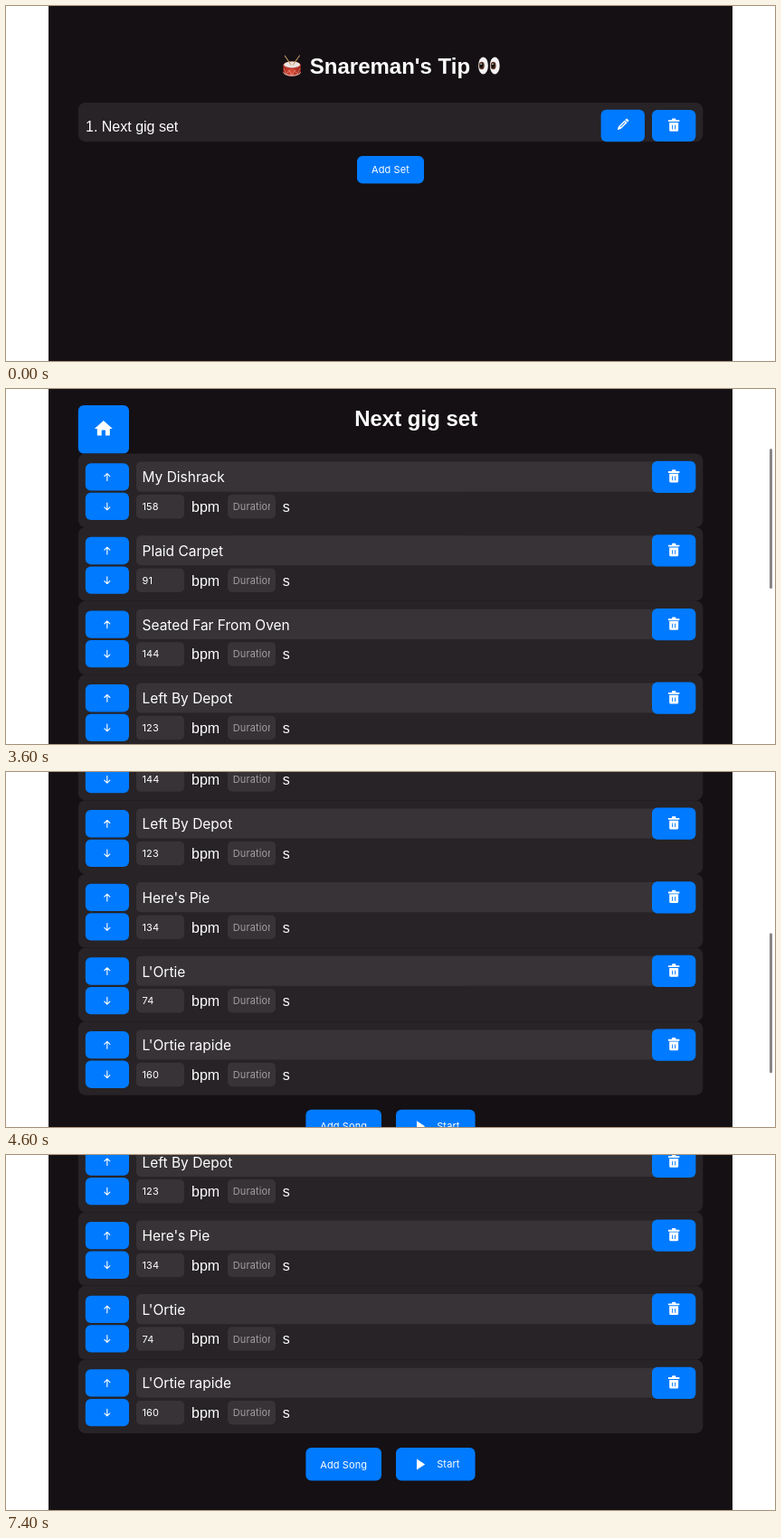
An HTML page for the animation above (8000 ms loop, 850x393 px).

```html
<!DOCTYPE html>
<html lang="en">
<head>
<meta charset="utf-8">
<title>Set list</title>
<style>
html, body { margin: 0; width: 100%; height: 100%; overflow: hidden; background: #fff; }
svg { display: block; }
#stage { position: absolute; left: 0; top: 0; }
text { fill: #fff; }
.head { font: bold 24px "Liberation Sans", Arial, sans-serif; }
.label { font: 16px "Liberation Sans", Arial, sans-serif; }
.name { font: 15.5px Inter, sans-serif; }
.small { font: 11px Inter, sans-serif; letter-spacing: .12px; }
.hint { fill: #a19ea1; }
</style>
</head>
<body>
<svg id="stage" width="850" height="393" viewBox="0 0 850 393">
  <defs>
    <linearGradient id="shell">
      <stop offset="0" stop-color="#a3261c"/>
      <stop offset=".45" stop-color="#dc4b36"/>
      <stop offset="1" stop-color="#962017"/>
    </linearGradient>
    <g id="trash" fill="#fff">
      <path d="M-2.2-5.4V-6.2Q-2.2-7.2-1.2-7.2H1.2Q2.2-7.2 2.2-6.2V-5.4H6.2V-3.5H-6.2V-5.4Z"/>
      <path fill-rule="evenodd" d="M-5-2.6H5V5.6Q5 7.1 3.5 7.1H-3.5Q-5 7.1-5 5.6ZM-2 .2V4.8H-1V.2ZM1 .2V4.8H2V.2Z"/>
    </g>
    <g id="pencil" transform="rotate(45)">
      <path fill="#fff" d="M-1.9-5H1.9V4.6L0 8.2L-1.9 4.6ZM-1.9-5.7V-7.3Q-1.9-8.2-1-8.2H1Q1.9-8.2 1.9-7.3V-5.7Z"/>
      <path fill="#007aff" d="M-.4-3.2H.4V3.6H-.4Z"/>
    </g>
    <path id="house" fill="#fff" d="M0-8.3L10 .6H7V8.3H2.1V2.3H-2.1V8.3H-7V.6H-10Z"/>
    <path id="arrow" fill="none" stroke="#fff" stroke-width="1.1" stroke-linecap="round" stroke-linejoin="round" d="M0 4V-3.6M-3-.8L0-3.8L3-.8"/>
    <g id="drum">
      <path fill="url(#shell)" d="M306.4 65V73.3A9.7 4.5 0 0 0 325.8 73.3V65Z"/>
      <path fill="none" stroke="#e8b9a0" stroke-width=".5" d="M307 69L310 75.5L313 71L316 77L319 71L322 75.5L325 69"/>
      <path fill="none" stroke="#cfc4c0" stroke-width="1" d="M306.6 73.4A9.6 4.3 0 0 0 325.6 73.4"/>
      <ellipse cx="316.1" cy="65.6" rx="9.7" ry="4.3" fill="#b93a30"/>
      <ellipse cx="316.1" cy="64.9" rx="9" ry="3.5" fill="#e9e4e1"/>
      <path fill="none" stroke="#c79a68" stroke-width="1.1" stroke-linecap="round" d="M308.3 55.2L315 65M324.4 55L317.4 65"/>
    </g>
    <g id="eye">
      <ellipse rx="5.4" ry="9.4" fill="#f4f2f2"/>
      <ellipse cx="-1.7" rx="3" ry="4.2" fill="#5b3426"/>
      <ellipse cx="-1.9" rx="1.8" ry="2.7" fill="#140d0b"/>
      <circle cx="-2.4" cy="-1.8" r=".8" fill="#fff"/>
    </g>
  </defs>
  <g id="home"></g>
  <g id="set"></g>
  <rect id="bar" x="844" width="3" rx="1.5" fill="#878487"/>
</svg>
<script>
const BG = "#151013", CARD = "#272326", FIELD = "#373336", BLUE = "#007aff";
const ROW_TOP = 71.4, ROW_H = 81.63, MAX_SCROLL = 334.7;
const $ = id => document.getElementById(id);

const box = (x, y, w, h, r, fill) =>
  `<rect x="${x}" y="${y}" width="${w}" height="${h}" rx="${r}" fill="${fill}"/>`;
const text = (x, y, cls, str, anchor = "start") =>
  `<text x="${x}" y="${y}" class="${cls}" text-anchor="${anchor}">${str}</text>`;
const icon = (id, x, y, extra = "") =>
  `<use href="#${id}" transform="translate(${x} ${y}) ${extra}"/>`;
const panel = (top, bottom) => box(47, top, 756, bottom - top, 0, BG);
const trashButton = y => box(714, y, 48.4, 35.2, 6, BLUE) + icon("trash", 738.2, y + 16.7);

const songs = [
  ["My Dishrack", 158],
  ["Plaid Carpet", 91],
  ["Seated Far From Oven", 144],
  ["Left By Depot", 123],
  ["Here's Pie", 134],
  ["L'Ortie", 74],
  ["L'Ortie rapide", 160]
];

function songRow([name, bpm], i) {
  return `<g transform="translate(0 ${ROW_TOP + i * ROW_H})">` +
    box(79.8, 0, 690.6, ROW_H, 8, CARD) +
    box(87.8, 10.8, 48.2, 30.3, 6, BLUE) + icon("arrow", 111.8, 26) +
    box(87.8, 43.4, 48.2, 30.3, 6, BLUE) + icon("arrow", 111.8, 58.7, "rotate(180)") +
    box(144, 9.2, 580, 33.1, 5, FIELD) + text(150.5, 32, "name", name) +
    trashButton(8.3) +
    box(144, 45.5, 53, 26.5, 5, FIELD) + text(150.5, 62.8, "small", bpm) +
    text(205, 64.6, "label", "bpm") +
    box(245, 45.5, 53, 26.5, 5, FIELD) +
    `<svg x="250.8" y="46" width="41.2" height="26">${text(0, 16.8, "small hint", "Duration")}</svg>` +
    text(305.8, 64.6, "label", "s") + "</g>";
}

$("home").innerHTML =
  panel(0, 393) +
  icon("drum", 0, 0) + text(335.8, 74.5, "head", "Snareman's Tip") +
  icon("eye", 527.5, 66) + icon("eye", 540.3, 66) +
  box(79.8, 107, 690.6, 43.2, 8, CARD) +
  text(88, 138.5, "label", "1. Next gig set") +
  box(657.6, 114.8, 48.4, 35.4, 6, BLUE) + icon("pencil", 681.6, 131.4) +
  trashButton(114.9) +
  box(388, 166, 74, 30.4, 6, BLUE) + text(425, 185.4, "small", "Add Set", "middle");

$("set").innerHTML =
  panel(-80, 393 + MAX_SCROLL) +
  box(79.8, 18, 56.2, 53.4, 6, BLUE) + icon("house", 107.8, 43.3) +
  text(453.2, 41.2, "head", "Next gig set", "middle") +
  songs.map(songRow).join("") +
  box(331.4, 658.8, 83.6, 36.5, 6, BLUE) + text(373.2, 681.3, "small", "Add Song", "middle") +
  box(431, 658.8, 87.6, 36.5, 6, BLUE) +
  `<path d="M454 671.2L463.2 677.2L454 683.2Z" fill="#fff"/>` +
  text(476.2, 680.8, "small", "Start");

// start time, page, scroll, scroll bar opacity
const steps = [
  [0, "home", 0, 0],
  [600, "home", 0, .5],
  [800, "home", 0, 1],
  [1600, "home", 0, .43],
  [1800, "home", 0, 0],
  [2600, "set", -13, 0],
  [3600, "set", 0, 1],
  [3800, "set", 10, 1],
  [4400, "set", 150, 1],
  [4600, "set", 285, 1],
  [4800, "set", 350, 1],
  [5000, "set", 339.3, 1],
  [5200, "set", 335.8, 1],
  [5400, "set", MAX_SCROLL, 1],
  [6400, "set", MAX_SCROLL, .43],
  [6600, "set", MAX_SCROLL, 0]
];

function draw(now) {
  const t = now % 8000;
  const [, page, scroll, alpha] = steps.filter(s => s[0] <= t).pop();
  const onSet = page === "set";
  $("home").style.display = onSet ? "none" : "";
  $("set").style.display = onSet ? "" : "none";
  $("set").setAttribute("transform", `translate(0 ${-scroll})`);

  // the bar shrinks while the page is pulled past its end
  const over = Math.max(0, scroll - MAX_SCROLL);
  const top = onSet ? 66 + .394 * Math.min(scroll, MAX_SCROLL) + over : 73;
  const bar = $("bar");
  bar.setAttribute("y", top);
  bar.setAttribute("height", onSet ? 155 - over : 242);
  bar.setAttribute("opacity", alpha);
}

const start = performance.now();
function tick() {
  draw(performance.now() - start);
  requestAnimationFrame(tick);
}
tick();
</script>
</body>
</html>
```
